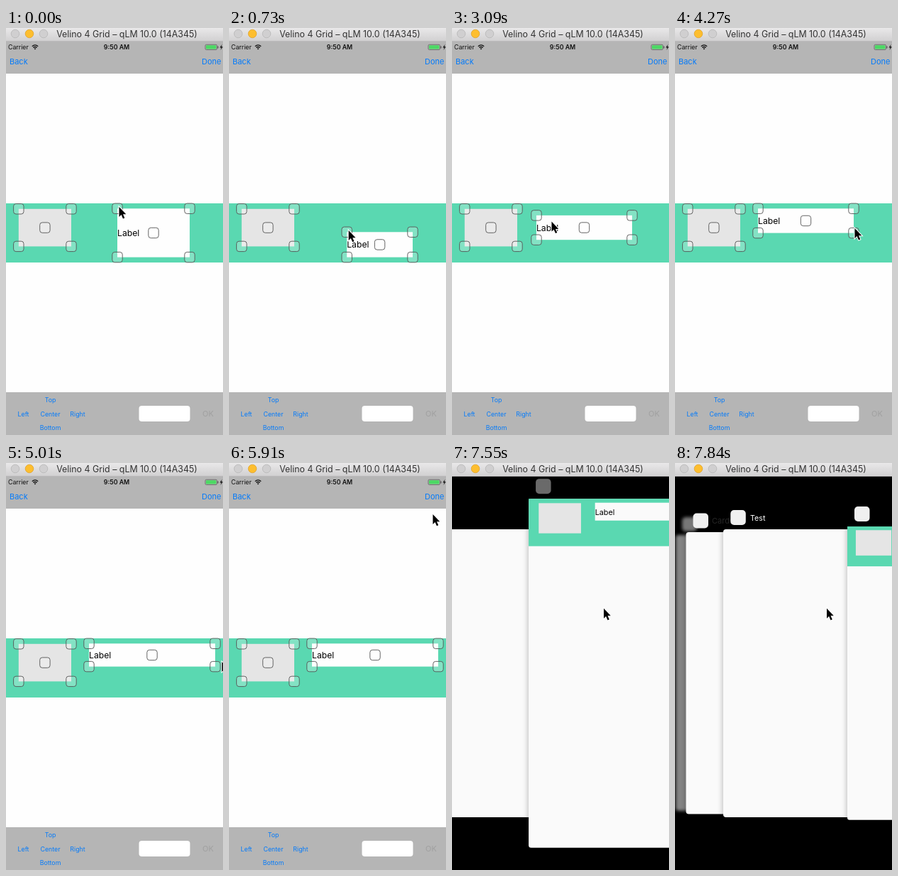
Recreate the animation shown at these times as an HTML page. Size 306 by 571 pixels, loop 7.99 s.

```html
<!DOCTYPE html>
<html lang="en">
<head>
<meta charset="utf-8">
<title>Layout editor</title>
<style>
  html, body { margin: 0; width: 100%; height: 100%; overflow: hidden; background: #fff; }
  svg { display: block; width: 306px; height: 571px; font-family: Inter, Roboto, sans-serif; }
  .soft { filter: blur(2px); }
  .lifted { filter: drop-shadow(-2px 0 3px #0003); }
</style>
</head>
<body>
<svg id="stage" viewBox="0 0 306 571"></svg>
<script>
const LOOP = 7990, STEP = 147.67, SWITCH_AT = 7550;
const BLUE = '#057bfa', GREEN = '#5ad8b1', BAR = '#b5b5b5', PAPER = '#fefefe';

// Each gesture moves the pointer by (dx, dy); a grip takes corners of the label box along.
const GESTURES = [
  { from: 100, to: 1030, dx: 12, dy: 43, grip: 'topLeft' },
  { from: 1180, to: 1620, dx: -35, dy: -3, grip: 'topLeft' },
  { from: 1180, to: 1620, dx: -13, dy: 7 },
  { from: 1620, to: 1900, dx: -10, dy: -6, grip: 'topLeft' },
  { from: 1900, to: 2350, dx: 32, dy: 4 },
  { from: 2500, to: 3425, dx: -7, dy: -34, grip: 'all' },
  { from: 3430, to: 4270, dx: 115, dy: 19 },
  { from: 4300, to: 4900, dx: 43, dy: -2, grip: 'bottomRight' },
  { from: 4850, to: 5000, dx: 8, dy: 0 },
  { from: 5010, to: 5760, dx: -15, dy: -176 },
  { from: 5760, to: 6050, dx: -4, dy: -61 }
];

const lerp = (a, b, p) => a + (b - a) * p;
const progress = (t, from, to) => Math.min(1, Math.max(0, (t - from) / (to - from)));
const smooth = p => p * p * (3 - 2 * p);

function pose(t) {
  const cursor = { x: 159, y: 251 };
  const box = { l: 157, t: 253.3, r: 259, b: 321.6 };
  for (const { from, to, dx, dy, grip } of GESTURES) {
    const p = smooth(progress(t, from, to));
    cursor.x += dx * p;
    cursor.y += dy * p;
    if (grip === 'topLeft' || grip === 'all') { box.l += dx * p; box.t += dy * p; }
    if (grip === 'bottomRight' || grip === 'all') { box.r += dx * p; box.b += dy * p; }
  }
  return { cursor, box };
}

const rect = (x, y, w, h, fill, more = '') =>
  `<rect x="${x}" y="${y}" width="${w}" height="${h}" fill="${fill}" ${more}/>`;
const text = (s, x, y, size, fill, more = '') =>
  `<text x="${x}" y="${y}" font-size="${size}" fill="${fill}" ${more}>${s}</text>`;
const centered = (s, x, y, size, fill, more = '') =>
  text(s, x, y, size, fill, `text-anchor="middle" ${more}`);
const move = (x, y, body, scale = 1) =>
  `<g transform="translate(${x} ${y}) scale(${scale})">${body}</g>`;

const handle = (x, y) =>
  rect(x - 7.2, y - 7.2, 14.4, 14.4, '#fff', 'rx="3.5" fill-opacity=".25" stroke="#555" stroke-width=".9"');

function editableBox({ l, t, r, b }, fill, label = '') {
  const cx = (l + r) / 2, cy = (t + b) / 2;
  return rect(l, t, r - l, b - t, fill) + text(label, l, cy + 4.5, 12.2, '#000') +
    handle(l, t) + handle(r, t) + handle(l, b) + handle(r, b) + handle(cx, cy);
}

function editor(box) {
  const button = (s, x, y) => centered(s, x, y, 8.8, BLUE);
  return rect(0, 19, 306, 552, PAPER) +
    rect(0, 19, 306, 45, BAR) +
    text('Back', 5, 51, 11, BLUE) +
    text('Done', 303.5, 51, 11, BLUE, 'text-anchor="end"') +
    rect(0, 246, 306, 83, GREEN) +
    editableBox({ l: 17.8, t: 253.8, r: 92, b: 306.4 }, '#e5e5e5') +
    editableBox(box, PAPER, 'Label') +
    rect(0, 511, 306, 60, BAR) +
    button('Top', 62.5, 525) + button('Left', 24.5, 545) + button('Center', 62.5, 545) +
    button('Right', 101, 545) + button('Bottom', 62.5, 564) +
    rect(187.5, 530, 72, 22, '#fff', 'rx="4"') +
    centered('OK', 285, 545, 11, '#a0a0a0');
}

// The finished layout, with its origin below the title bar
const preview = paper => rect(0, 0, 306, 552, paper, 'rx="4"') +
  rect(0, 0, 280.5, 75, GREEN) +
  rect(16, 7, 67.3, 47.7, '#e5e5e5') +
  rect(105.5, 6.3, 161.5, 28.2, paper) +
  text('Label', 105.5, 25.5, 12.2, '#000');

const statusBar = text('Carrier', 3, 30, 8.8, '#111') +
  `<path d="M36.8 25.7q4.2-3.6 8.4 0M38.4 27.6q2.6-2.2 5.2 0" fill="none" stroke="#111" stroke-width="1.3"/>
   <path d="M39.6 28.8q1.4-1.2 2.8 0L41 30.4z" fill="#111"/>` +
  centered('9:50 AM', 156, 30, 8.8, '#111', 'font-weight="600"') +
  rect(281, 23.3, 16.5, 7.2, 'none', 'rx="1.5" stroke="#555" stroke-width=".7"') +
  rect(282, 24.3, 14.5, 5.2, '#4cd964', 'rx=".8"') +
  rect(298.3, 25.5, 1.2, 3, '#555') +
  '<path d="M304.5 23l-3 4.5h2l-1 3.5 3.3-4.7h-2z" fill="#111"/>';

const windowButton = (x, fill, edge) =>
  `<circle cx="${x}" cy="8" r="5.8" fill="${fill}" stroke="${edge}" stroke-width=".8"/>`;

const titleBar = `<linearGradient id="chrome" x2="0" y2="1">
    <stop stop-color="#e9e8e9"/><stop offset="1" stop-color="#d0cfd0"/></linearGradient>` +
  rect(0, 0, 306, 19, 'url(#chrome)') + rect(0, 18, 306, 1, '#bcbbbc') +
  windowButton(13, '#d0cfd0', '#b7b6b7') +
  windowButton(33, '#fdbe2f', '#e0a32a') +
  windowButton(53, '#d0cfd0', '#b7b6b7') +
  centered('Velino 4 Grid – qLM 10.0 (14A345)', 170.5, 13, 12.4, '#333');

const pointer = ({ x, y }) => move(x, y,
  '<path d="M.5 0V14L3.6 11.1 6 16.4 8.3 15.4 6 10.3H10.3Z" stroke="#fff" stroke-width="2" paint-order="stroke"/>');

const icon = (x, y) => rect(x, y, 21.5, 21, '#f0f0f0', 'rx="5"');
const card = (x, y, h) => rect(x, y, 228, h, '#fafafa', 'rx="4" class="lifted"');

function switcher(p) {
  const others =
    `<g class="soft">${rect(1, 101, 60, 387, '#858585', 'rx="4"')}${rect(10, 76, 21, 20, '#777', 'rx="5"')}</g>` +
    card(15.5, 97, 395.5) + icon(25.5, 70.5) + text('Cards', 52, 85, 11, '#262626') +
    card(68, 93, 404) + icon(78.3, 66) + text('Test', 106, 80.5, 10.7, '#fff');
  const x = lerp(0, 243, p), y = lerp(19, 89, p);
  return rect(0, 0, 306, 571, '#000') +
    move(lerp(-260, 0, p), 0, others) +
    `<g class="lifted">${move(x, y, preview('#fafafa'), lerp(1, .746, p))}</g>` +
    `<g opacity="${p}">${icon(x + 10, y - 28)}</g>`;
}

function scene(t, switching) {
  if (switching) {
    const p = 1 - (1 - progress(t, 7430, 7827)) ** 2;
    return switcher(p) + titleBar + pointer({ x: 213.5, y: 204 });
  }
  const { cursor, box } = pose(t);
  const drop = smooth(progress(t, 5950, 6300));
  return move(0, 19, preview(PAPER)) + move(0, 552 * drop, editor(box)) +
    statusBar + titleBar + pointer(cursor);
}

const stage = document.getElementById('stage');
const start = performance.now();
let shown = '';

// The picture advances in even steps, like a screen capture
function draw() {
  const t = (performance.now() - start) % LOOP;
  const tick = Math.floor(t / STEP + .12);
  const switching = t >= SWITCH_AT;
  const key = `${tick} ${switching}`;
  if (key !== shown) {
    stage.innerHTML = scene(tick * STEP, switching);
    shown = key;
  }
  requestAnimationFrame(draw);
}
draw();
</script>
</body>
</html>
```
